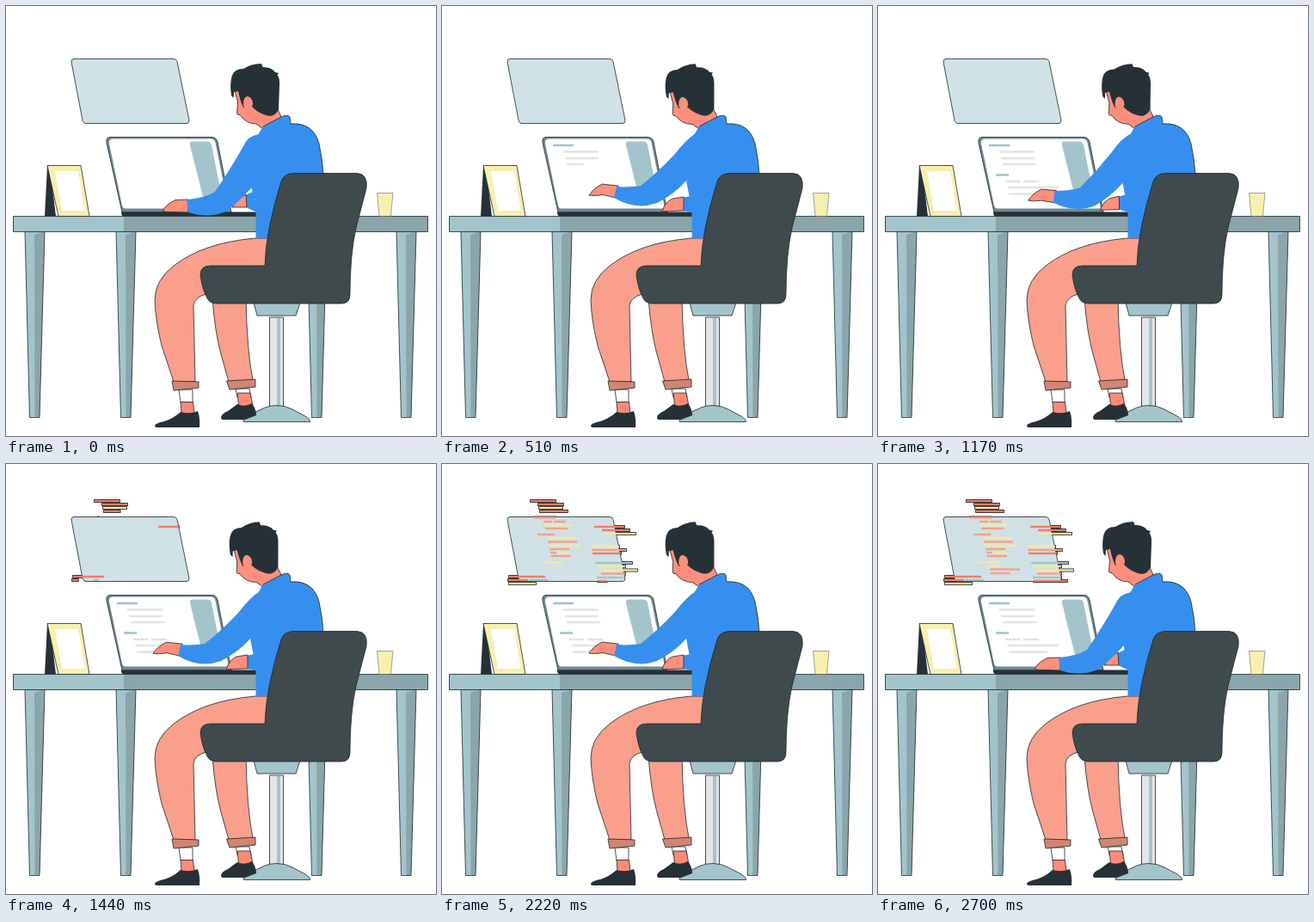
An HTML page that plays this animation: 500x500 px, repeating every 2.73 s.

```html
<!DOCTYPE html>
<html lang="en">
<head>
<meta charset="utf-8">
<title>Working at a desk</title>
<style>
  html, body { margin: 0; width: 100%; height: 100%; overflow: hidden; background: #fff; }
  svg { display: block; width: 100vw; height: 100vh; }
  .line { stroke: #1d272b; stroke-width: .8; stroke-linejoin: round; }
</style>
</head>
<body>
<svg viewBox="0 0 500 500">
  <!-- floating panel; the bar edges show only outside it -->
  <g id="edges"></g>
  <path class="line" fill="#d0e1e5" d="M79 61.5H195Q198 61.5 199 64.5L213 133Q213 136.500 210 136.500H93Q90 136.500 89 133L76 65Q76 61.500 79 61.500Z"/>
  <g id="code"></g>

  <g id="legs"></g>

  <!-- table top -->
  <path fill="#a3c4cb" d="M8 244.500H137V262.500H8Z"/>
  <path fill="#8aa5ab" d="M137 244.500H490.500V262.500H137Z"/>
  <path class="line" fill="none" d="M8.500 244.500H490.500V262.500H8.500Z"/>

  <!-- picture frame and cup -->
  <path fill="#263137" d="M48 186H51L58 244.500H45Z"/>
  <path class="line" fill="#f6efb0" d="M48 185.500H87L97 244.500H61Z"/>
  <path fill="#fff" d="M57 192H84L91.500 238H65Z"/>
  <path class="line" stroke-opacity=".5" fill="#f6efb0" d="M431.500 217.500H450L447.500 244.500H434Z"/>

  <!-- laptop -->
  <path class="line" fill="#718a91" d="M121 152.500H239Q244.500 152.500 246 158L262 240H135L117 159Q116 152.500 121 152.500Z"/>
  <path fill="#fff" d="M125 154.500H238Q242.500 154.500 243.500 159L259 235.500H139Q136 235.500 135 232L120 160Q119 154.500 125 154.500Z"/>
  <path fill="#a3c4cb" d="M217 157.500H234Q238 157.500 239 161.500L251 222H229L214 162Q213 157.500 217 157.500Z"/>
  <g id="page"></g>
  <path fill="#263137" d="M134 239.500H292V244.500H137Q134 244.500 134 239.500Z"/>

  <!-- chair stand -->
  <path class="line" fill="#e5e5e5" d="M306.500 362H322.500V468H306.500Z"/>
  <path fill="#a3c4cb" d="M315 363H319V467H315Z"/>
  <path class="line" fill="#a3c4cb" d="M276 482Q278 478 286 474L301 467Q307 464.500 315 464.500Q325 464.500 333 469L348 477Q354 481 353.500 483.500H278Q275 483.500 276 482Z"/>
  <path class="line" fill="#a3c4cb" d="M288 345H342L337 360H292Z"/>

  <!-- far leg -->
  <path class="line" fill="#fff" d="M267 445H283L285 455H269Z"/>
  <path class="line" fill="#ff8a77" d="M269 450H284L287 465L271 469Z"/>
  <path fill="#263137" d="M250 478Q251 474 258 471L269 463Q277 467 286 462Q291 469 291 476L278 481H252Q250 481 250 478Z"/>
  <path class="line" fill="#f99f8b" d="M240 340Q243 380 250 405L259 437L287 435Q280 400 279 340Z"/>
  <path class="line" fill="#d18573" d="M256.500 436L290 434V443L260 446Z"/>

  <!-- near leg -->
  <path class="line" fill="#fff" d="M201 446H217V461H203Z"/>
  <path class="line" fill="#ff8a77" d="M203 460.500H217.500L219 474H204Z"/>
  <path fill="#263137" d="M173 488Q174 485 184 483Q194 480 203 472Q214 475 223 471Q226 480 225 490H176Q173 490.500 173 488Z"/>
  <path class="line" fill="#f99f8b" d="M290 270Q230 275 195 302Q173 319 173 342Q174 367 181 395L195 437H220L218 348Q220 338 233 335L305 310V270Z"/>
  <path class="line" fill="#d18573" d="M193 436L224 437V444L195 447Z"/>

  <path id="farSleeve" fill="#368fee"/>
  <path id="farHand" class="line" fill="#ff8f7d"/>

  <g id="head">
    <path class="line" fill="#ff8f7d" d="M266 98L269.500 112L268.500 125Q269 127 272 126.500Q279 137 291 137L299 143L322 133L315 118L300 100Z"/>
    <path fill="#263137" d="M262 104Q260 92 262.500 82Q265 73 276 73Q285 67 297 67L298.500 71Q309 71 313 77L317 78L315.500 80Q318.500 84 318 92L317 120Q314 127 307 128Q294 126 286 117L276 118Q272 110 270 99L265 100L264.500 107Z"/>
    <path fill="#ff8f7d" d="M276 115Q276 105 281 105Q287 107 287 114Q286 120 278 121Z"/>
  </g>

  <path fill="#368fee" d="M293 150L299 140L318 130Q327 125 330 129L331 137Q357 135 364 160Q368 178 369 196L330 270H290.500V240Q288 222 284 203Z"/>
  <path class="line" fill="none" d="M299 140L318 130Q327 125 330 129L331 137Q357 135 364 160Q368 178 369 196"/>
  <path id="hand" class="line" fill="#ff8f7d"/>
  <path id="arm" fill="#368fee"/>

  <!-- chair seat and back -->
  <path class="line" fill="#3f4a4d" d="M238 302Q226 302 226 313Q228 329 234 340Q237 346 245 346H390Q400 346 400 335Q400 290 407 258L419 212Q421 195 408 194.500H334Q323 195 320 204Q302 262 301 302Z"/>
</svg>

<script>
const LOOP = 2730, STEP = 30, CYCLE = LOOP / 3;
const COLORS = { r: '#f6a08c', R: '#ee7d6c', y: '#f3e8a6', b: '#a3c4cb', g: '#e4e4e2' };
const EDGE = 0.8;
const $ = id => document.getElementById(id);

function add(parent, tag, attrs) {
  const el = document.createElementNS('http://www.w3.org/2000/svg', tag);
  for (const key in attrs) el.setAttribute(key, attrs[key]);
  parent.append(el);
  return el;
}

for (const x of [22, 128, 350, 454]) {
  const leg = add($('legs'), 'g', { transform: `translate(${x} 262)` });
  add(leg, 'path', { fill: '#a3c4cb', d: 'M0 0H23L17 216H5.500Z' });
  add(leg, 'path', { fill: '#8aa5ab', d: 'M11 4L23 0L17 216H11.500Z' });
  add(leg, 'path', { class: 'line', fill: 'none', d: 'M0 0H23L17 216.500H5.500Z' });
}

// Each bar grows from its left end; rows in a group start one after another.
const bars = [];
function group(parent, start, gap, grow, height, rows) {
  rows.split(';').forEach((row, i) => {
    for (const part of row.split('|')) {
      const [color, x, y, end] = part.split(' ');
      const top = y - height / 2;
      const bar = { width: end - x, start: start + gap * i, grow };
      bar.el = add($(parent), 'rect', { x, y: top, height, fill: COLORS[color] });
      if (parent === 'code') {
        bar.edge = add($('edges'), 'rect', {
          x: x - EDGE, y: top - EDGE, height: height + 2 * EDGE, fill: '#1d272b'
        });
      }
      bars.push(bar);
    }
  });
}

group('page', 150, 95, 150, 2.6,
  'b 129 162 153;g 141 169.5 182;g 143 177 182;g 145 184 184;' +
  'b 137 196.500 152;g 148 204 165|g 169 204 187;g 151 211 210;g 152 218.500 197');
group('code', 1190, 62, 110, 2.4,
  'R 103 43 132;R 112 47 141;y 113 51 140;R 114 55 146;r 107 62.500 132;' +
  'r 118 67 128|r 130 67 144;y 119 71 152;r 120 75 146;r 111 82 131;y 122 86 155;' +
  'r 123 90.500 157;y 124 95 161;r 125 99 148;r 126 103 133|y 134 103 148;' +
  'r 127 107 150;y 117 114.500 143;y 129 118.500 142;r 130 122.500 165;r 131 127 154');
group('code', 1365, 75, 110, 2.4,
  'R 177 73 212;R 186 77 218;y 189 81 225;y 173 96 206;r 174 100 214;R 175 104 208;' +
  'b 178 115 221;y 180 119 213;y 183 123.500 227;r 185 127.500 213;b 180 132 213;R 181 136 220');
group('code', 1345, 62, 110, 2.4,
  'R 78 131 120;R 77 135 100|b 101 135 123;y 78 139 109');

// Paths for hands resting and reaching, blended number by number.
const poses = {
  arm: [
    'M299 140L294 149Q281 151 276 163Q262 188 243 216Q229 224 210 225L212 240Q236 248 258 238Q272 226 286 211L310 190Z',
    'M299 140L295 148Q285 154 270 173Q250 194 231 209Q217 211 203 210L200 223Q225 238 250 229Q270 219 284 203L310 190Z'],
  hand: [
    'M212 225L197 225.500Q187 230 182 238Q185 240 196 239.500L212 240Z',
    'M205 209L186 207Q176 212 171 220Q175 221 187 219.500L202 223Z'],
  farHand: [
    'M263 234Q266 229 271 224L279 219L280 234Z',
    'M256 239Q259 228 268 224L281 222L281 238Z'],
  farSleeve: [
    'M276 221L287 216L292 240L277 233Z',
    'M279 223L289 221L292 240L279 238Z']
};
const blend = (a, b, k) => {
  const to = b.match(/[\d.]+/g);
  let i = 0;
  return a.replace(/[\d.]+/g, n => (+n + (to[i++] - n) * k).toFixed(2));
};
const smooth = k => k * k * (3 - 2 * k);

function draw(t) {
  const reach = smooth((1 - Math.cos(2 * Math.PI * t / CYCLE)) / 2);
  for (const id in poses) $(id).setAttribute('d', blend(...poses[id], reach));
  $('head').setAttribute('transform', `rotate(${-2 * reach} 302 136)`);
  for (const { el, edge, width, start, grow } of bars) {
    const w = width * Math.min(1, Math.max(0, (t - start) / grow));
    el.setAttribute('width', w);
    if (edge) edge.setAttribute('width', w && w + 2 * EDGE);
  }
}

const begin = performance.now();
function tick() {
  const t = (performance.now() - begin) % LOOP;
  draw(Math.floor(t / STEP) * STEP);
  requestAnimationFrame(tick);
}
tick();
</script>
</body>
</html>
```
